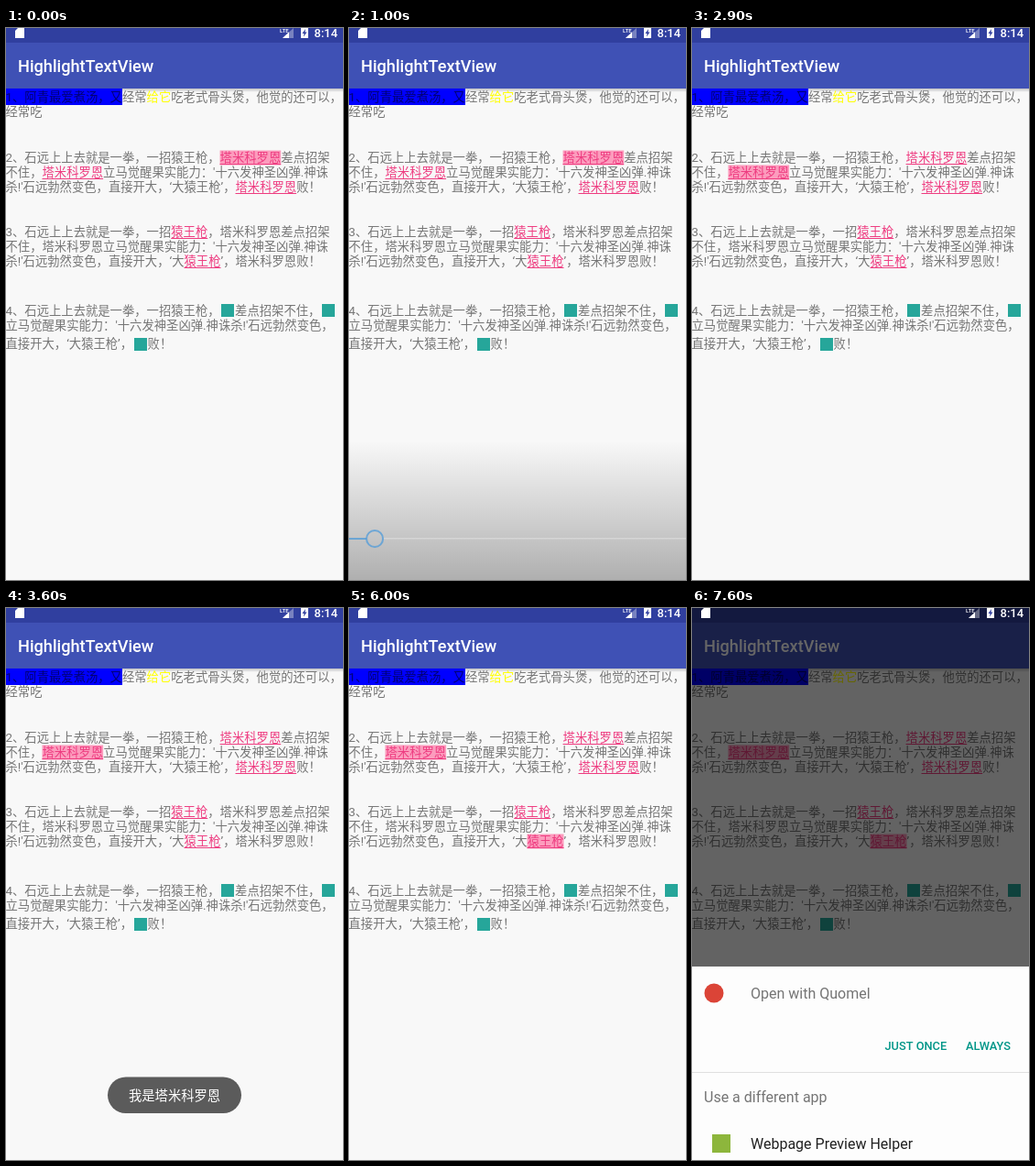
An HTML page with a canvas for the animation above (8000 ms loop, 368 by 602 pixels).

```html
<!DOCTYPE html>
<html lang="zh-CN">
<head>
<meta charset="utf-8">
<title>HighlightTextView</title>
<style>
html, body { margin: 0; width: 100%; height: 100%; overflow: hidden; background: #f8f8f8; }
canvas { display: block; }
</style>
</head>
<body>
<canvas id="stage" width="368" height="602"></canvas>
<script>
const ctx = document.getElementById('stage').getContext('2d');
const W = 368, H = 602, LOOP = 8000, STEP = 100;
const FAMILY = 'Roboto, "Noto Sans CJK SC", "Noto Sans CJK", sans-serif';
const GREY = '#757575', TEAL = '#26a69a', PINK = '#ee3c80';

// [link]  {blue background}  <yellow>  # inline icon; each row: centre y, text
const ROWS = [
  [75.2, '{1、阿青最爱煮汤，又}经常<给它>吃老式骨头煲，他觉的还可以，'],
  [91.2, '经常吃'],
  [141, '2、石远上上去就是一拳，一招猿王枪，[塔米科罗恩]差点招架'],
  [157, "不住，[塔米科罗恩]立马觉醒果实能力：'十六发神圣凶弹.神诛"],
  [173, "杀!'石远勃然变色，直接开大，‘大猿王枪’，[塔米科罗恩]败！"],
  [222, '3、石远上上去就是一拳，一招[猿王枪]，塔米科罗恩差点招架'],
  [238, "不住，塔米科罗恩立马觉醒果实能力：'十六发神圣凶弹.神诛"],
  [254, "杀!'石远勃然变色，直接开大，‘大[猿王枪]’，塔米科罗恩败！"],
  [308, '4、石远上上去就是一拳，一招猿王枪，#差点招架不住，#'],
  [324, "立马觉醒果实能力：'十六发神圣凶弹.神诛杀!'石远勃然变色，"],
  [344.5, '直接开大，‘大猿王枪’，#败！']
].map(([y, text]) => [y, text.split(/([\[{<][^\]}>]*[\]}>]|#)/).filter(Boolean)]);

const ramp = (t, from, to) => Math.min(1, Math.max(0, (t - from) / (to - from)));

function rect(x, y, w, h, color) {
  ctx.fillStyle = color;
  ctx.fillRect(x, y, w, h);
}

function shape(color, points) {
  ctx.fillStyle = color;
  ctx.beginPath();
  points.forEach(([x, y]) => ctx.lineTo(x, y));
  ctx.fill();
}

function disc(x, y, r, color) {
  ctx.fillStyle = color;
  ctx.beginPath();
  ctx.arc(x, y, r, 0, 7);
  ctx.fill();
}

function label(text, x, y, size, color, weight = 400) {
  ctx.font = `${weight} ${size}px ${FAMILY}`;
  ctx.fillStyle = color;
  ctx.fillText(text, x, y);
}

function withAlpha(alpha, draw) {
  if (alpha <= 0) return;
  ctx.save();
  ctx.globalAlpha = alpha;
  draw();
  ctx.restore();
}

// Vertical black gradient between two opacities
function fade(y0, y1, alpha0, alpha1) {
  const gradient = ctx.createLinearGradient(0, y0, 0, y1);
  gradient.addColorStop(0, `rgba(0,0,0,${alpha0})`);
  gradient.addColorStop(1, `rgba(0,0,0,${alpha1})`);
  rect(0, y0, W, y1 - y0, gradient);
}

function drawRow(y, runs, pressed) {
  let x = -0.5;
  for (const run of runs) {
    if (run === '#') {
      rect(Math.round(x + 1.7), Math.round(y - 7), 14, 14, TEAL);
      x += 16.5;
      continue;
    }
    const kind = run[0];
    const text = '[{<'.includes(kind) ? run.slice(1, -1) : run;
    ctx.font = `400 13.33px ${FAMILY}`;
    const width = ctx.measureText(text).width;
    if (kind === '{') rect(0, 66, Math.round(x + width), 18, '#0000ff');
    if (kind === '[' && pressed) rect(x, y - 7.5, width, 16, '#fc9cbd');
    const color = { '[': PINK, '<': '#ffff00', '{': '#000075' }[kind] || GREY;
    label(text, x, y + 4.8, 13.33, color);
    if (kind === '[') rect(x, y + 7, width, 1, color);
    x += width;
  }
}

function drawPage(t) {
  rect(0, 0, W, H, '#f8f8f8');
  fade(66, 70, 0.22, 0);
  const pressed = [t < 2900 ? 141 : 157, t >= 6000 ? 254 : 0];
  for (const [y, runs] of ROWS) drawRow(y, runs, pressed.includes(y));
  rect(0, 0, W, 16, '#303f9f');
  rect(0, 16, W, 50, '#3f51b5');
  label('HighlightTextView', 13, 48, 18.15, '#fff', 500);
}

function drawStatus() {
  shape('#fff', [[13, 0], [20, 0], [20, 11], [10, 11], [10, 3]]);
  label('LTE', 299, 5, 6, '#fff', 500);
  shape('rgba(255,255,255,.35)', [[314, 0], [314, 11], [302, 11]]);
  shape('#fff', [[309, 4.5], [309, 11], [302, 11]]);
  rect(322, 0, 8, 11, '#fff');
  shape('#303f9f', [[327, 1], [323.5, 6], [325.5, 6], [325, 9.5], [328.5, 4.5], [326.5, 4.5]]);
  label('8:14', 336.5, 10, 13, '#fff', 500);
}

function drawPlayer(t) {
  const strength = Math.min(ramp(t, 0, 300), 1 - ramp(t, 600, 1400));
  if (!strength) return;
  const x = 5 + (t - 300) * 0.033, y = 557;
  fade(450, H, 0, 0.59 * strength);
  withAlpha(Math.min(1, strength * 1.5), () => {
    rect(Math.max(0, x + 9), y - 1, W, 1.5, 'rgba(255,255,255,.38)');
    rect(0, y - 1, Math.max(0, x - 9), 2, '#4f9bd9');
    ctx.strokeStyle = '#4f9bd9';
    ctx.lineWidth = 2;
    ctx.beginPath();
    ctx.arc(x, y, 9, 0, 7);
    ctx.stroke();
  });
}

function drawToast(t) {
  const out = ramp(t, 4900, 5400);
  withAlpha(ramp(t, 2950, 3600) * (1 - out ** 1.6), () => {
    ctx.fillStyle = '#5b5b5b';
    ctx.beginPath();
    ctx.roundRect(111, 511.5, 146, 39.5, 19.75);
    ctx.fill();
    label('我是塔米科罗恩', 134, 536.5, 14.3, '#fff');
  });
}

function drawSheet(t) {
  withAlpha(ramp(t, 6900, 7100), () => {
    rect(0, 391, W, H - 391, '#fdfdfd');
    disc(24, 420, 10.5, '#db4437');
    label('Open with Quomel', 64, 426, 16, GREY);
    label('JUST ONCE', 210.5, 482, 12.8, '#009688', 500);
    label('ALWAYS', 299, 482, 12.8, '#009688', 500);
    rect(0, 506, W, 1, '#e0e0e0');
    label('Use a different app', 13, 539, 16, GREY);
    rect(22, 574, 20, 20, '#8db63c');
    label('Webpage Preview Helper', 64, 590, 16, '#212121');
  });
}

function render(now) {
  const t = Math.floor((now % LOOP) / STEP) * STEP;
  drawPage(t);
  drawPlayer(t);
  drawToast(t);
  withAlpha(0.6 * ramp(t, 7200, 7600), () => rect(0, 0, W, H, '#000'));
  drawStatus();
  drawSheet(t);
}

const start = performance.now();
function frame() {
  render(performance.now() - start);
  requestAnimationFrame(frame);
}
frame();
</script>
</body>
</html>
```
